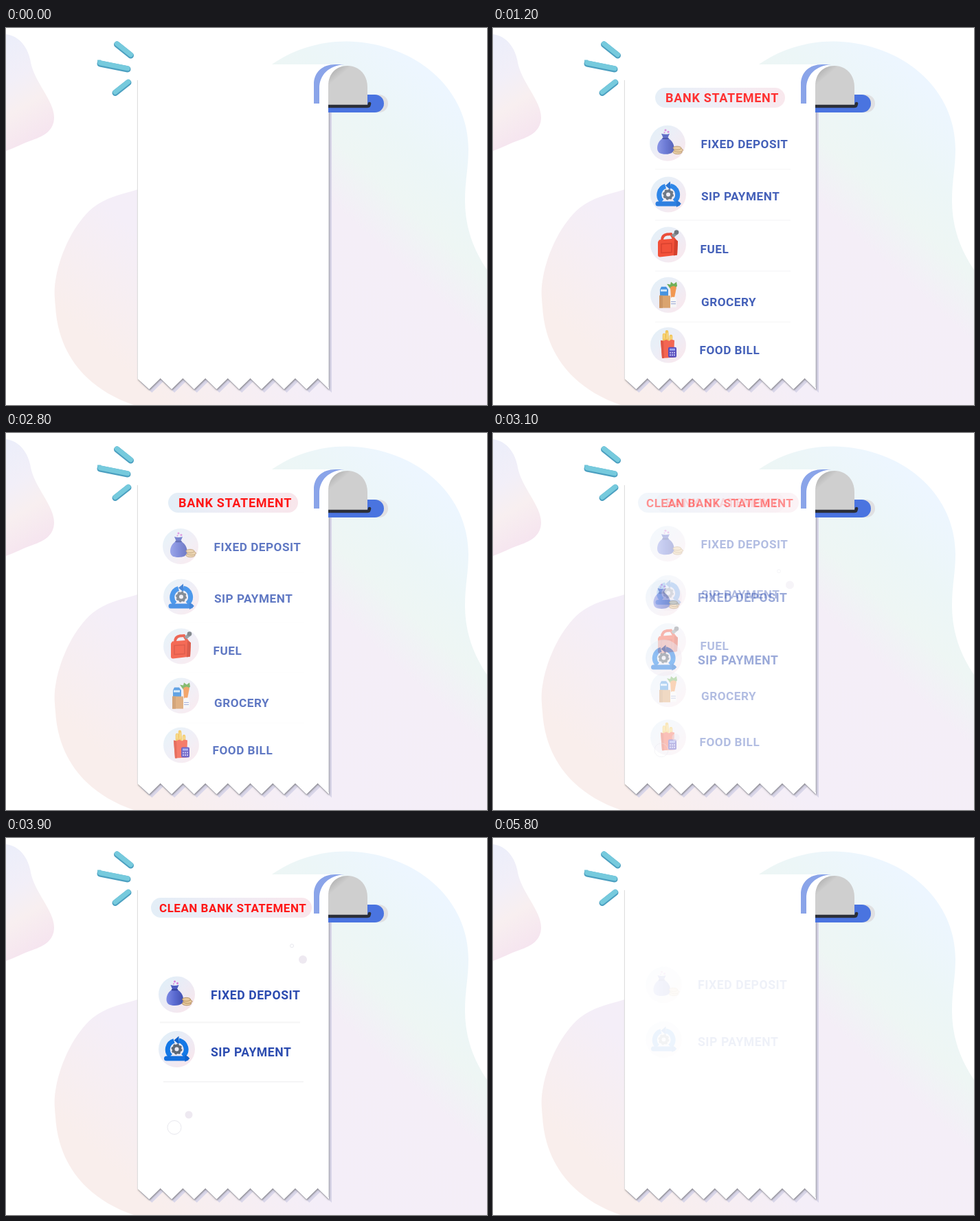
Recreate the animation shown at these times as an HTML page. Size 700 px wide and 549 px high, loop 6000 ms.

```html
<!DOCTYPE html>
<html lang="en">
<head>
<meta charset="utf-8">
<title>Bank statement</title>
<style>
html, body { margin: 0; width: 100%; height: 100%; overflow: hidden; background: #fff; }
svg { display: block; width: 700px; height: 549px; }
text { font-family: Roboto, Arial, sans-serif; font-weight: 600; fill: #2c4cb0; }
.title { fill: #ff1616; font-weight: 700; }
.rule { stroke: #f5f5f6; stroke-width: 2; }
.ring { fill: none; stroke: #e8e8ee; }
.dot { fill: #eee9f1; }
</style>
</head>
<body>
<svg viewBox="0 0 700 549">
<defs>
  <linearGradient id="wash" gradientUnits="userSpaceOnUse" x1="640" y1="90" x2="205" y2="571">
    <stop offset="0" stop-color="#edf6ff"/><stop offset=".15" stop-color="#ecf6f7"/>
    <stop offset=".25" stop-color="#eef6f4"/><stop offset=".36" stop-color="#f4eef7"/>
    <stop offset=".7" stop-color="#f4eef8"/><stop offset=".95" stop-color="#f9eeec"/>
  </linearGradient>
  <linearGradient id="wash2" x1=".2" y1="0" x2=".45" y2="1">
    <stop offset="0" stop-color="#eceefa"/><stop offset=".35" stop-color="#f2eff8"/>
    <stop offset=".62" stop-color="#f8eff0"/><stop offset="1" stop-color="#f5e3ef"/>
  </linearGradient>
  <linearGradient id="pill"><stop offset="0" stop-color="#e3eef7"/><stop offset=".5" stop-color="#efecf5"/><stop offset="1" stop-color="#f9e6eb"/></linearGradient>
  <linearGradient id="disc" x1=".1" y1=".1" x2=".9" y2=".9"><stop offset="0" stop-color="#e1eff8"/><stop offset=".5" stop-color="#ecebf5"/><stop offset="1" stop-color="#f8e6ec"/></linearGradient>
  <linearGradient id="sack"><stop offset="0" stop-color="#7c8ae4"/><stop offset=".5" stop-color="#5a6ad0"/><stop offset="1" stop-color="#4350b0"/></linearGradient>
  <linearGradient id="dome" x1="0" y1="0" x2=".5" y2=".6"><stop offset=".1" stop-color="#a9a9a9"/><stop offset=".5" stop-color="#cfcfcf"/></linearGradient>
  <filter id="soft" x="-10%" y="-10%" width="120%" height="120%"><feDropShadow dx=".5" dy="1.5" stdDeviation="1.3" flood-color="#555" flood-opacity=".7"/></filter>

  <g id="money">
    <path d="M-9-14q6 2 12 0l-3 7h-6z" fill="#4d5cc0"/>
    <path d="M-6-8H0C5-5 9.500 0 9.500 7C9.500 14 4 16-3 16S-15 14-15 7C-15 0-11-5-6-8z" fill="url(#sack)"/>
    <path d="M-6.500-7h7" stroke="#3644a0" stroke-width="2.400" stroke-linecap="round"/>
    <g fill="#d77fd8"><circle cx="-3" cy="-19" r="1.500"/><circle cx="1" cy="-16.500" r="1.500"/><circle cx="-4.500" cy="-15.500" r="1"/></g>
    <g fill="#e7c89b" stroke="#a98453" stroke-width=".8">
      <ellipse cx="14.500" cy="13" rx="6.500" ry="2.800"/><ellipse cx="16" cy="10" rx="6.500" ry="2.800"/><ellipse cx="14" cy="7" rx="6" ry="2.600"/>
    </g>
  </g>
  <g id="cycle">
    <path d="M-9 10A13 13 0 0 1-4-12M3-12.600A13 13 0 0 1 9 10" fill="none" stroke="#1478e6" stroke-width="7"/>
    <path d="M-4-13l7-6v12z" fill="#0f62cc"/>
    <path d="M-15 13.500H14" stroke="#136fdd" stroke-width="7" stroke-linecap="round"/>
    <path d="M12 8l7 5.500l-7 5z" fill="#0f62cc"/>
    <circle r="5" fill="none" stroke="#5d6876" stroke-width="4"/>
    <circle r="7" fill="none" stroke="#5d6876" stroke-width="2" stroke-dasharray="2.750"/>
  </g>
  <g id="can">
    <path d="M-9-6Q-9-14-2-15L4-15.500L9-7" fill="none" stroke="#e8361f" stroke-width="4"/>
    <path d="M6-12l6-5" stroke="#7f868d" stroke-width="5"/><circle cx="12" cy="-18" r="3.300" fill="#5d646b"/>
    <path d="M-13-7L10-9L14-5L13 15L-12 18Q-15 18-15 15V-4z" fill="#f13a20"/>
    <path d="M9-8l5 3l-1 20l-5 1z" fill="#cf2812"/>
    <path d="M-10-1L5-2V11L-10 12z" fill="none" stroke="#d42a14" stroke-width="1.500"/>
  </g>
  <g id="basket">
    <path d="M3-9L-2-16l5 1l1-4l4 3l4-3l1 6l-4 4z" fill="#5fa544"/>
    <path d="M3-11q5-4 9 0L9 4H4z" fill="#f08a3c"/>
    <path d="M-12-8l2-4h7l3 4V3h-12z" fill="#2f86dc"/><path d="M-11-8h9v3h-9z" fill="#cfe6fa"/>
    <path d="M-13 1H3V19H-13z" fill="#d6985c"/><path d="M-13 1h5V19h-5z" fill="#c58850"/>
    <path d="M5 3h5l2 4V18H3V7z" fill="#f5f5f5"/><path d="M4 10h7M4 13h7" stroke="#8b9ad0"/>
  </g>
  <g id="meal">
    <g stroke="#f1bd43" stroke-width="4.500" stroke-linecap="round"><path d="M-6-5V-15M-1-5L-2-19.500M4-5V-13"/></g>
    <path d="M-6-16v7M-1.500-18v9M4-13v5" stroke="#f9dc86" stroke-width="1.300"/>
    <path d="M-11-7l4 1l4-2l4 2l4-2l4 1L8 18L-9 19z" fill="#f2523c"/><path d="M-11-7l4 1l1 25h-3z" fill="#dd402b"/>
    <rect y="3" width="12" height="15" rx="2" fill="#4338b5"/>
    <rect x="2" y="5" width="8" height="3" fill="#8f9af0"/>
    <path d="M2 11h8M2 14.500h8" stroke="#b9b4f0" stroke-width="2" stroke-dasharray="2 1"/>
  </g>
</defs>

<path fill="url(#wash2)" d="M0 9C20 12 32 28 36 50C41 78 70 106 70 130C70 149 56 157 39 163C24 168 12 175 0 179z"/>
<path fill="url(#wash)" d="M387 53C417 32 456 19 497 19.500C598 22 673 90 673 176C673 204 668 222 668 251C668 290 680 322 700 352V549H186C118 526 76 476 72 406C70 386 70 378 73 362C80 325 100 284 126 262C146 246 170 242 192 235L300 53z"/>

<g id="ticks"></g>

<path id="shade" fill="#d9d6e9" transform="translate(4 5)"/>
<path id="sheet" fill="#fff" filter="url(#soft)"/>
<path d="M191.500 76V511" stroke="#dedede"/>
<path d="M470 112V523" stroke="#bdbcc8"/>
<path d="M188 50H300V53H490L475 70L470 112H194V76H188z" fill="#fff"/>
<circle cx="543" cy="110" r="13" fill="#e0e0e2"/>
<path d="M469 97H537A13 13 0 0 1 537 123H469z" fill="#4a74e0"/>
<path d="M448 110V82C448 64 461 53 479 53H492C470 55 456 68 456 88V110z" fill="#8aa4e9"/>
<path d="M469 112V84C469 66 481 55 497 55C514 55 526 68 526 86V112z" fill="url(#dome)"/>
<path d="M469 114H526Q529 114 529 109.500" fill="none" stroke="#2b2f38" stroke-width="4.500"/>
<circle cx="529" cy="110" r="2.250" fill="#2b2f38"/>

<g id="stage"></g>
</svg>

<script>
const $ = id => document.getElementById(id);
const clamp = v => Math.min(1, Math.max(0, v));

// Paper outline with a torn lower edge
const tooth = 278 / 17;
let outline = "M192 511";
for (let i = 1; i <= 17; i++) outline += `L${192 + i * tooth} ${i % 2 ? 526 : 510}`;
$("shade").setAttribute("d", outline + "V108H300z");
$("sheet").setAttribute("d", outline + "V112H440V60H192z");

$("ticks").innerHTML = ["M161.5 23.5L181.500 39.500", "M137 51.500L177 59.500", "M159 94L178 79"].map((d, i) => {
  const stroke = (color, w, dy) =>
    `<path d="${d}" stroke="${color}" stroke-width="${w}" stroke-linecap="round" transform="translate(0 ${dy})"/>`;
  const flatEnd = i === 1 ? '<path d="M133 46.500h5v9l-5-1z" fill="#71c5da"/>' : "";
  return flatEnd + stroke("#4b9fc0", 9, .5) + stroke("#76cadd", 7, -.7);
}).join("");

const movers = [];
function add(page, markup, opt) {
  const el = document.createElementNS("http://www.w3.org/2000/svg", "g");
  el.innerHTML = markup;
  $("stage").append(el);
  movers.push({ el, page, drop: 0, lift: 0, kind: "item", ...opt });
}
const label = (x, y, size, gap, str, cls = "") =>
  `<text x="${x}" y="${y}" font-size="${size}" letter-spacing="${gap}" class="${cls}">${str}</text>`;
const pill = (x, w) => `<rect x="${x}" y="87" width="${w}" height="29" rx="14.5" fill="url(#pill)"/>`;
const badge = (x, y, r, icon) =>
  `<g transform="translate(${x} ${y})"><circle r="${r}" fill="url(#disc)"/><use href="#${icon}"/></g>`;
const rule = (x, y, w) => `<path class="rule" d="M${x} ${y}h${w}"/>`;
const circle = (x, y, r, cls) => `<circle cx="${x}" cy="${y}" r="${r}" class="${cls}"/>`;

add(0, pill(236, 189) + label(251, 108, 18, .7, "BANK STATEMENT", "title"), { kind: "title" });
[
  ["money", 254, 166, 302.5, 173, "FIXED DEPOSIT"],
  ["cycle", 255, 240, 303, 248.5, "SIP PAYMENT"],
  ["can", 255, 312.5, 301.5, 325, "FUEL"],
  ["basket", 255, 385, 303, 401, "GROCERY"],
  ["meal", 255, 457.5, 300.5, 470.5, "FOOD BILL"]
].forEach(([icon, x, y, tx, ty, name], i) => {
  const move = { drop: 28.6 + 9.5 * i, lift: 10 + 5 * i };
  add(0, badge(x, y, 26, icon) + label(tx, ty, 17.2, .5, name), move);
  if (i < 4) add(0, rule(236, 204 + 73.5 * i, 197), { ...move, kind: "rule" });
});

add(1, pill(211, 234) + label(223, 108, 17, .5, "CLEAN BANK STATEMENT", "title"), { kind: "title" });
add(1, badge(248.5, 228, 26.5, "money") + label(298, 234.5, 17.6, .55, "FIXED DEPOSIT"), { drop: 27, lift: 16 });
add(1, rule(224, 268.5, 204), { drop: 36, lift: 16, kind: "rule" });
add(1, badge(248.5, 307.5, 26.5, "cycle") + label(298, 317.5, 17.6, .55, "SIP PAYMENT"), { drop: 45, lift: 16 });
add(1, rule(229, 355, 204), { drop: 55, lift: 16, kind: "rule" });
add(1, circle(266, 403, 5.5, "dot") + circle(245, 421.5, 10, "ring"), { drop: 91, lift: 16, kind: "bubble" });
add(1, circle(432, 177, 6, "dot") + circle(416, 157, 2.5, "ring"), { drop: 100, lift: 16, kind: "bubble" });

const pages = [
  { start: 450, rise: 1250, leave: 2550 },
  { start: 2850, rise: 1050, leave: 5050 }
];

function draw(now) {
  // The picture steps ten times a second and rests on its last step
  const t = Math.min(5800, Math.floor(now % 6000 / 100) * 100);
  for (const { el, page, drop, lift, kind } of movers) {
    const { start, rise, leave } = pages[page];
    const rest = 1 - clamp((t - start) / rise);
    const out = clamp((t - leave) / 800);
    let alpha = 1 - rest ** 2.35;
    if (kind === "title" && page === 0) alpha *= 1 - clamp((t - 2800) / 400);
    else if (kind === "title" || kind === "bubble") alpha *= clamp(1 - 1.2 * out);
    else alpha *= 1 - out ** 1.2;
    if (kind === "rule") alpha = clamp((alpha - .75) / .25);
    el.setAttribute("opacity", alpha.toFixed(3));
    el.setAttribute("transform", `translate(0 ${(drop * rest ** 3 - lift * out ** 2).toFixed(2)})`);
  }
  requestAnimationFrame(draw);
}
requestAnimationFrame(draw);
</script>
</body>
</html>
```
